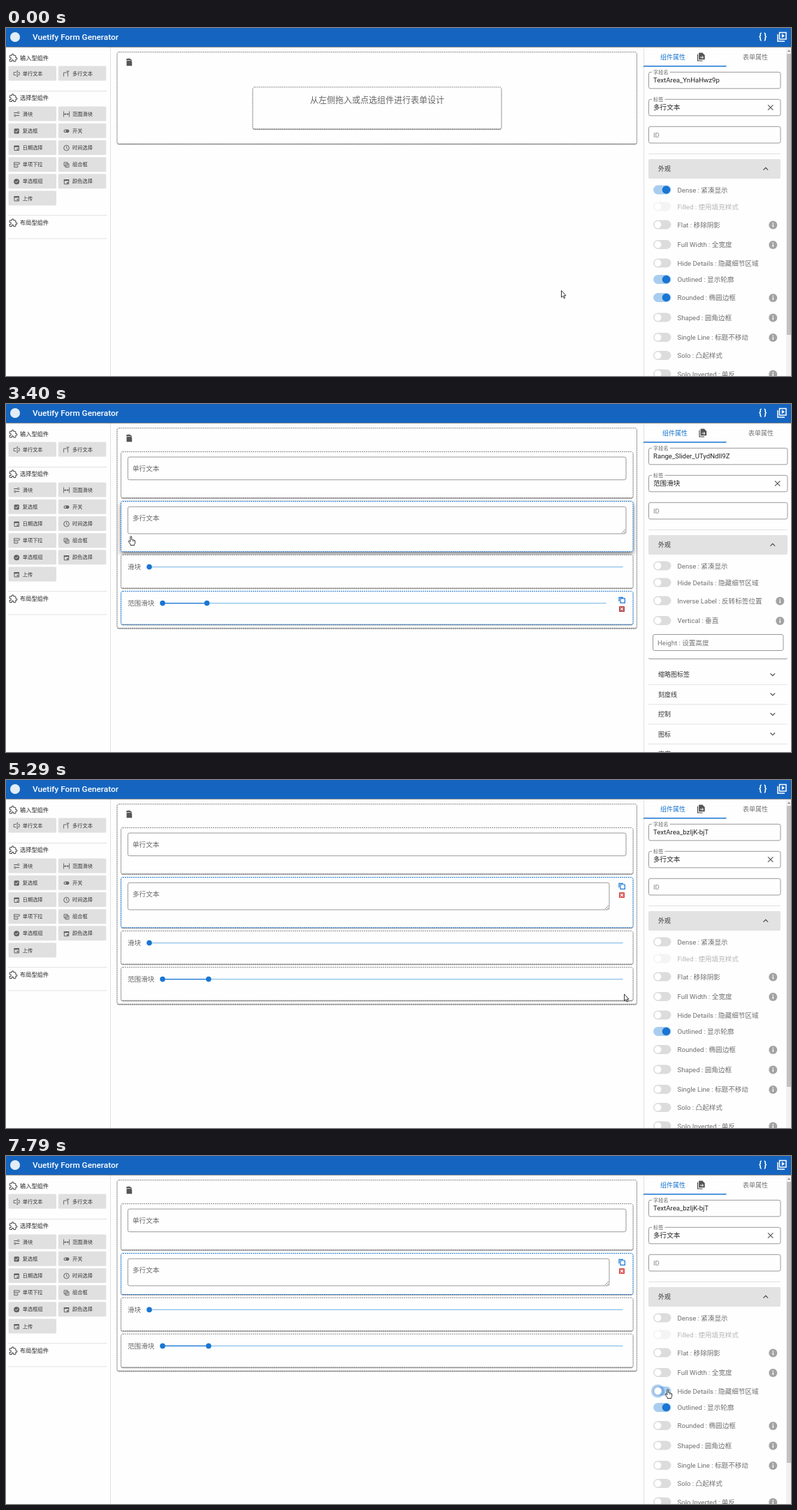
Animation, 1123 px wide and 499 px high, one loop 8000 ms. Source, as an HTML page:

```html
<!DOCTYPE html>
<html lang="zh">
<head>
<meta charset="utf-8">
<style>
html,body{margin:0;width:100%;height:100%;overflow:hidden;background:#fefefe}
svg{display:block;width:1123px;height:499px;font-family:Roboto,"Noto Sans CJK SC","Noto Sans CJK",sans-serif}
.low{filter:drop-shadow(0 1px .7px rgba(0,0,0,.4))}
.high{filter:drop-shadow(0 3px 3px rgba(0,0,0,.5))}
</style>
</head>
<body>
<svg id="stage" viewBox="0 0 1123 499"></svg>
<script>
const BLUE = '#1976d2', GREY = '#616161', LOOP = 8000;
const TIMES = [0, 290, 600, 910, 1220, 1540, 1850, 2170, 2470, 2780, 3090, 3400, 3720, 4040, 4360,
  4660, 4970, 5280, 5590, 5900, 6210, 6530, 6830, 7140, 7460, 7790];

// Pointer waypoints: step, x, y, shape from there on
const PATH = [[0, 795, 382, 'arrow'], [3, 58, 68, 'move'], [4, 51, 65, 'move'], [6, 107, 65, 'click'],
  [7, 72, 92, 'arrow'], [8, 46, 118, 'click'], [9, 62, 121, 'move'], [10, 104, 123, 'click'],
  [11, 180, 196, 'hand'], [14, 470, 251, 'hand'], [16, 760, 335, 'arrow'], [18, 1010, 290, 'arrow'],
  [19, 937, 238, 'hand'], [23, 937, 238, 'hand'], [25, 948, 341, 'hand']];

// Helpers
const rect = (x, y, w, h, fill, more = '') => `<rect x="${x}" y="${y}" width="${w}" height="${h}" fill="${fill}" ${more}/>`;
const line = (x1, y1, x2, y2, color, w = 1) => `<path d="M${x1} ${y1}L${x2} ${y2}" stroke="${color}" stroke-width="${w}"/>`;
const dot = (x, y, r, fill, more = '') => `<circle cx="${x}" cy="${y}" r="${r}" fill="${fill}" ${more}/>`;
const stroke = (d, color, w = 1, fill = 'none') => `<path d="${d}" fill="${fill}" stroke="${color}" stroke-width="${w}"/>`;
const at = (x, y, body, k = 1) => `<g transform="translate(${x} ${y}) scale(${k})">${body}</g>`;
const text = (x, cy, s, size, fill = '#666', more = '') =>
  `<text x="${x}" y="${cy + size * .37}" font-size="${size}" fill="${fill}" ${more}>${s}</text>`;
const box = (x, y, r, b, color = '#999') => rect(x, y, r - x, b - y, 'none', `rx="2.5" stroke="${color}"`);

// Icons, centred on 0,0
const calendar = c => stroke('M-3.2-2.8h6.4v6.3h-6.4z', c) + rect(-3.7, -3.3, 7.4, 2.2, c) + rect(.3, .7, 2, 2, c);
const ICONS = {
  field: c => stroke('M-.5-2H-4V2H-.5M2.5-2H4V2H2.5M1-4V4M0-4H2M0 4H2', c, .9),
  area: c => stroke('M-4 4V-1.5H1M2-4V4M0-3.5H4', c, .9),
  slider: c => stroke('M-4-2H1M-1 2H4', c) + dot(2.3, -2, 1.3, 'none', `stroke="${c}"`) + dot(-2.3, 2, 1.3, 'none', `stroke="${c}"`),
  range: c => stroke('M-4-4V4M4-4V4M-2.8 0H2.8M-1.3-1.5L-2.8 0L-1.3 1.5M1.3-1.5L2.8 0L1.3 1.5', c, .9),
  check: c => rect(-3.6, -3.6, 7.2, 7.2, c, 'rx="1"') + stroke('M-2 0L-.6 1.5L2-1.5', '#fff'),
  toggle: c => rect(-4, -2.3, 8, 4.6, c, 'rx="2.3"') + dot(-1.7, 0, 1.2, '#e0e0e0'),
  date: calendar,
  clock: c => dot(0, 0, 3.8, 'none', `stroke="${c}"`) + stroke('M0-2.3V.3L1.7 1.4', c, .9),
  select: c => stroke('M-4-3.4H4M-4-1H1M-3.5-3.4V3.5H1.5V-1M-2 1H0M2-1H4V-3.4', c, .9),
  combo: c => stroke('M-3.5-3.5H1.5V1.5H-3.5ZM-1.5-1.5H3.5V3.5H-1.5Z', c, .9),
  radio: c => dot(0, 0, 4, c) + stroke('M-2 0L-.6 1.5L2-1.5', '#e0e0e0'),
};
const PUZZLE = 'M20.5 11H19V7c0-1.1-.9-2-2-2h-4V3.5a2.5 2.5 0 0 0-5 0V5H4c-1.1 0-2 .9-2 2v3.8h1.5a2.7 2.7 0 0 1 0 5.4H2V20c0 1.1.9 2 2 2h3.8v-1.5a2.7 2.7 0 0 1 5.4 0V22H17c1.1 0 2-.9 2-2v-4h1.5a2.5 2.5 0 0 0 0-5z';
const HAND = 'M-2.2 1V-5.2Q-2.2-6.4-1.2-6.4T-.2-5.2V-1.5Q.6-2.2 1.5-1.2Q2.4-1.7 3.1-.7Q4.7-1 4.7.8V3Q4.6 4.5 3.7 5.2V6.5H-2V5.2L-4.6 1.6Q-5.2.2-4 .1Q-3.1.1-2.2 1.5Z';

const BUTTONS = [
  ['field', '单行文本', 0, 65], ['area', '多行文本', 1, 65],
  ['slider', '滑块', 0, 123], ['range', '范围滑块', 1, 123],
  ['check', '复选框', 0, 147.3], ['toggle', '开关', 1, 147.3],
  ['date', '日期选择', 0, 171.5], ['clock', '时间选择', 1, 171.5],
  ['select', '单项下拉', 0, 195.7], ['combo', '组合框', 1, 195.7],
  ['radio', '单选框组', 0, 219.8], ['date', '颜色选择', 1, 219.8], ['date', '上传', 0, 244]];

function topBar() {
  return rect(0, 0, 1123, 27, '#1565c0', 'class="low"') + dot(13, 13, 7, '#e3edf8') +
    text(38, 13, 'Vuetify Form Generator', 11.8, '#fff', 'font-weight="500"') +
    text(1077, 12.5, '{ }', 12.5, '#fff', 'font-weight="700"') +
    stroke('M1106.5 6.5h9.5v9.5h-9.5zM1104 9v10h10', '#fff', 1.5) +
    '<path d="M1109.8 8.3v6l4.3-3z" fill="#fff"/>';
}

function sidebar(hover) {
  let s = line(149.5, 27, 149.5, 499, '#e0e0e0');
  for (const [y, name] of [[42.5, '输入型组件'], [100, '选择型组件'], [279, '布局型组件']])
    s += at(4.2, y - 5.7, `<path d="${PUZZLE}" fill="none" stroke="#444" stroke-width="2"/>`, .51) + text(20, y, name, 8.2, '#222');
  for (const y of [90.5, 268.5, 302]) s += line(3, y, 144, y, '#e2e2e2');
  BUTTONS.forEach(([icon, name, col, y], i) => {
    const x = 3.5 + col * 71.3, on = i === hover;
    s += rect(x, y - 10.5, 68.5, 21, on ? '#e3f2fd' : '#e0e0e0', on ? `rx="1" stroke="${BLUE}" stroke-dasharray="2 1"` : 'rx="1.5"');
    s += at(x + 11.7, y + .5, ICONS[icon](on ? BLUE : GREY)) + text(x + 20.3, y, name, 7.2, on ? BLUE : '#333');
  });
  return s;
}

function card(x, y, r, b, o = {}) {
  const edge = o.blue ? BLUE : '#8a8a8a';
  return `<g class="${o.high ? 'high' : 'low'}">` + rect(x, y, r - x, b - y, o.fill || '#fefefe', `rx="2.5" stroke="${edge}" stroke-dasharray="2 1"`) + '</g>';
}

const tools = (y, red) => stroke(`M879 ${y + 10.5}h6.3v6.3h-6.3zM877 ${y + 14.7}v-5.8h6`, BLUE, 1.2) +
  rect(877, y + 21.5, 8, 8, red, 'rx=".6"') + stroke(`M879 ${y + 23.5}l4 4m0-4l-4 4`, '#fff', 1.1);

function canvas(s) {
  const areaEnd = s.hide ? 198.5 : s.dense ? 207 : 211.7;
  const tops = [68.5, 139.5, areaEnd + 4.7, areaEnd + 56.7];
  const ends = [134.5, areaEnd, areaEnd + 52.2, areaEnd + 104.4];
  const bottom = s.count ? ends[s.count - 1] + 5.2 : 166;
  let out = card(159, 34.5, 902.5, bottom) +
    at(176, 49.3, '<path d="M-3.5-2.5H2.6L4.2-1V5H-3.5ZM-4-4.5L-2.3-5.6H1.2L4-3.2V-2L1.5-3.4H-4Z" fill="#555"/>');
  if (!s.count) return out + card(353, 84.8, 708.8, 144.7) + text(435, 104, '从左侧拖入或点选组件进行表单设计', 12, '#666');
  for (let i = 0; i < s.count; i++) {
    const y = tops[i], picked = s.sel === i, right = picked ? 863 : 887, end = picked ? 858.5 : 882.5;
    const pressed = i === 1 && s.pressed;
    out += card(164.5, y, 897, ends[i], {
      blue: (picked && !pressed) || s.over === i, high: i === 1 && (pressed || s.over === 1), fill: pressed ? '#dfdfdf' : 0 });
    if (i === 0) out += box(174.3, 76, right, 108.7) + text(181, 92, '单行文本', 9.6);
    if (i === 1) {
      const b = s.dense ? 183.5 : 186;
      out += box(174.3, 147.3, right, b) + text(181, s.dense ? 158.3 : 163, '多行文本', 9.6) +
        stroke(`M${right - 6} ${b - 1}l5-5M${right - 3} ${b - 1}l2-2`, '#777', .8);
    }
    if (i > 1) {
      const ly = y + 17.2, range = i === 3, x = range ? 224 : 205;
      out += text(174, ly, range ? '范围滑块' : '滑块', 9.6) + line(x, ly, end, ly, '#8bbfe9', 1.3) + dot(x, ly, 3.8, BLUE);
      if (range) {
        const x2 = x + (end - x) * .1;
        out += line(x, ly, x2, ly, BLUE, 1.4) + dot(x2, ly, 3.8, BLUE);
      }
    }
    if (picked) out += tools(y, pressed ? '#96474b' : s.over === 1 && i === 3 ? '#b94a4a' : '#d9534f');
  }
  return out;
}

const ROWS = [['Dense : 紧凑显示', 232], ['Filled : 使用填充样式', 256], ['Flat : 移除阴影', 282, 1], ['Full Width : 全宽度', 310.5, 1],
  ['Hide Details : 隐藏细节区域', 337], ['Outlined : 显示轮廓', 360.5], ['Rounded : 椭圆边框', 386.5, 1], ['Shaped : 圆角边框', 415, 1],
  ['Single Line : 标题不移动', 443.5, 1], ['Solo : 凸起样式', 469.5], ['Solo Inverted : 单反', 496, 1]];
const SLIDER_ROWS = [['Dense : 紧凑显示', 232], ['Hide Details : 隐藏细节区域', 256], ['Inverse Label : 反转标签位置', 282, 1], ['Vertical : 垂直', 310.5, 1]];

function toggle(y, on, off, ripple) {
  const x = on ? 944.5 : 932.5, half = ripple && !on;
  return rect(926, y - 6.5, 25.5, 13, off ? '#f4f4f4' : on || half ? '#a9cdef' : '#dcdcdc', 'rx="6.5"') +
    (ripple ? dot(x, y, 9.5, BLUE, 'opacity=".35"') : '') +
    dot(x, y, on ? 5.8 : 5.4, on ? BLUE : '#fff', on ? '' : `stroke="${off ? '#eee' : '#d2d2d2'}" stroke-width=".6"`);
}

function field(y, r, label, value) {
  const w = label.length * 7.2;
  return box(919.5, y, r, y + 23.5) + rect(924, y - 1, w + 4, 2, '#fefefe') + text(926, y + .3, label, 7.2) + text(926, y + 11.5, value, 9.6, '#222');
}

function panel(s) {
  const wide = s.sel > 1, r = wide ? 1118 : 1108, dx = r - 1108;
  const chevron = (y, d) => stroke(`M${r - 24.5} ${y + 1.7 * d}l3.3 ${-3.3 * d}l3.3 ${3.3 * d}`, '#444', 1.1);
  let out = rect(912, 28, 211, 471, '#fefefe') + line(912.5, 28, 912.5, 499, '#e0e0e0');
  out += text(936 + dx * .3, 42, '组件属性', 9, BLUE, 'font-weight="500"') + text(1054 + dx * .8, 42, '表单属性', 9, '#757575') +
    rect(912, 54, 118.5, 1.5, BLUE);
  out += at(994.5 + dx * .25, 41.5, stroke('M-5-4V5.5H2', '#444', 1.1) + '<path d="M-3.4-6H1.8L5.2-2.6V3.7H-3.4Z" fill="#555"/>' +
    stroke('M-1.5.6H3M1.2-1.2L3 .6L1.2 2.4', '#fff', 1));
  out += field(63.3, r, '字段名', s.id) + field(102.3, r, '标签', s.label) +
    stroke(`M${r - 18} 110.3l7.4 7.4m0-7.4l-7.4 7.4`, '#555', 1.1) + box(919.5, 141.3, r, 165) + text(926, 153, 'ID', 9.6, '#888') +
    line(919, 180.5, r, 180.5, '#e0e0e0');
  out += rect(919, 188, r - 919, wide ? 177 : 330, '#fefefe', 'rx="2" class="low"') + rect(919, 188, r - 919, 28, '#e2e2e2', 'rx="2"') +
    text(933, 202, '外观', 9, '#333') + chevron(202, 1);
  (wide ? SLIDER_ROWS : ROWS).forEach(([name, y, info], i) => {
    const off = !wide && i === 1;
    out += toggle(y, !wide && s.on.includes(i), off, s.ripple === i) + text(960.5, y, name, 9.6, off ? '#b5b5b5' : '#707070');
    if (info) out += dot(r - 10.7, y + .5, 6, '#a3a3a3') + rect(r - 11.4, y - .5, 1.4, 4, '#fff') + rect(r - 11.4, y - 2.8, 1.4, 1.4, '#fff');
  });
  if (wide) {
    out += box(925.5, 330.5, 1112, 353.5) + text(932, 342, 'Height : 设置高度', 9.6, '#777') + rect(919, 374, 199, 140, '#fefefe', 'class="low"');
    ['缩略图标签', '刻度线', '控制', '图标', '高度'].forEach((name, i) => {
      const y = 388 + i * 28.4;
      out += text(933, y, name, 9, '#333') + chevron(y, -1) + line(919, y + 14.3, r, y + 14.3, '#e3e3e3');
    });
  } else {
    out += rect(1116, 28, 7, 471, '#f1f1f1') + rect(1117, 37, 6, 403, '#c1c1c1') + '<path d="M1117.8 34h4.4l-2.2-2.6z" fill="#888"/>';
  }
  return out;
}

function pointer(step) {
  let i = 0;
  while (i < PATH.length - 1 && PATH[i + 1][0] <= step) i++;
  const [a, x, y, kind] = PATH[i], [b, x2, y2] = PATH[i + 1] || [a + 1, x, y];
  const k = (step - a) / (b - a);
  const cross = 'M0-6L2.2-3.6H.9V-.9H3.6V-2.2L6 0L3.6 2.2V.9H.9V3.6H2.2L0 6L-2.2 3.6H-.9V.9H-3.6V2.2L-6 0L-3.6-2.2V-.9H-.9V-3.6H-2.2Z';
  const shapes = {
    arrow: () => stroke('M-.5-5.5V4.2L1.7 2.2L3.2 5.6L4.7 5L3.3 1.7H6Z', '#222', .9, '#fff'),
    move: () => stroke(cross, '#333', .8, '#fff'),
    click: () => dot(0, 0, 6.5, '#ffee33', 'opacity=".75"') + stroke(cross, '#8c8420', .8, '#fff04a'),
    hand: () => stroke(HAND, '#222', .9, '#fff') + stroke('M1.5-1V1.2M3.1-.6V1.4', '#222', .6),
  };
  return at(x + (x2 - x) * k, y + (y2 - y) * k, shapes[kind]());
}

function stateAt(n) {
  const s = { count: 0, sel: -1, over: -1, hover: -1, on: [5], ripple: -1, id: 'TextArea_YnHaHwz9p', label: '多行文本' };
  const pick = (sel, id, label) => Object.assign(s, { sel, id, label, count: Math.max(s.count, sel + 1) });
  if (n < 4) s.on = [0, 5, 6];
  if (n >= 4) pick(0, 'TextField_W_eSowTlc', '单行文本');
  if (n >= 6) pick(1, 'TextArea_bzIjK-bjT', '多行文本');
  if (n >= 9) pick(2, 'Slider_Kq3vTnX8d', '滑块');
  if (n >= 11) pick(3, 'Range_Slider_UTydNdlI9Z', '范围滑块');
  if (n >= 12) pick(1, 'TextArea_bzIjK-bjT', '多行文本');
  if (n === 3 || n === 4) s.hover = 0;
  if (n === 5 || n === 6) s.hover = 1;
  if (n === 8 || n === 9) s.hover = 2;
  if (n === 10) s.hover = 3;
  if (n === 11 || n === 12) s.over = 1;
  if (n === 13 || n === 14) s.over = 2;
  s.pressed = n >= 12 && n <= 14;
  s.dense = n === 21 || n === 22;
  if (s.dense) s.on = [0, 5];
  s.hide = n >= 25;
  if (n === 21 || n === 23) s.ripple = 0;
  if (n === 25) s.ripple = 4;
  return s;
}

const stage = document.getElementById('stage');
const start = performance.now();
let shown = -1;
function tick() {
  const t = (performance.now() - start) % LOOP;
  const step = TIMES.filter(v => v <= t).length - 1;
  if (step !== shown) {
    const s = stateAt(step);
    stage.innerHTML = sidebar(s.hover) + canvas(s) + panel(s) + topBar() + pointer(step);
    shown = step;
  }
  requestAnimationFrame(tick);
}
tick();
</script>
</body>
</html>
```
